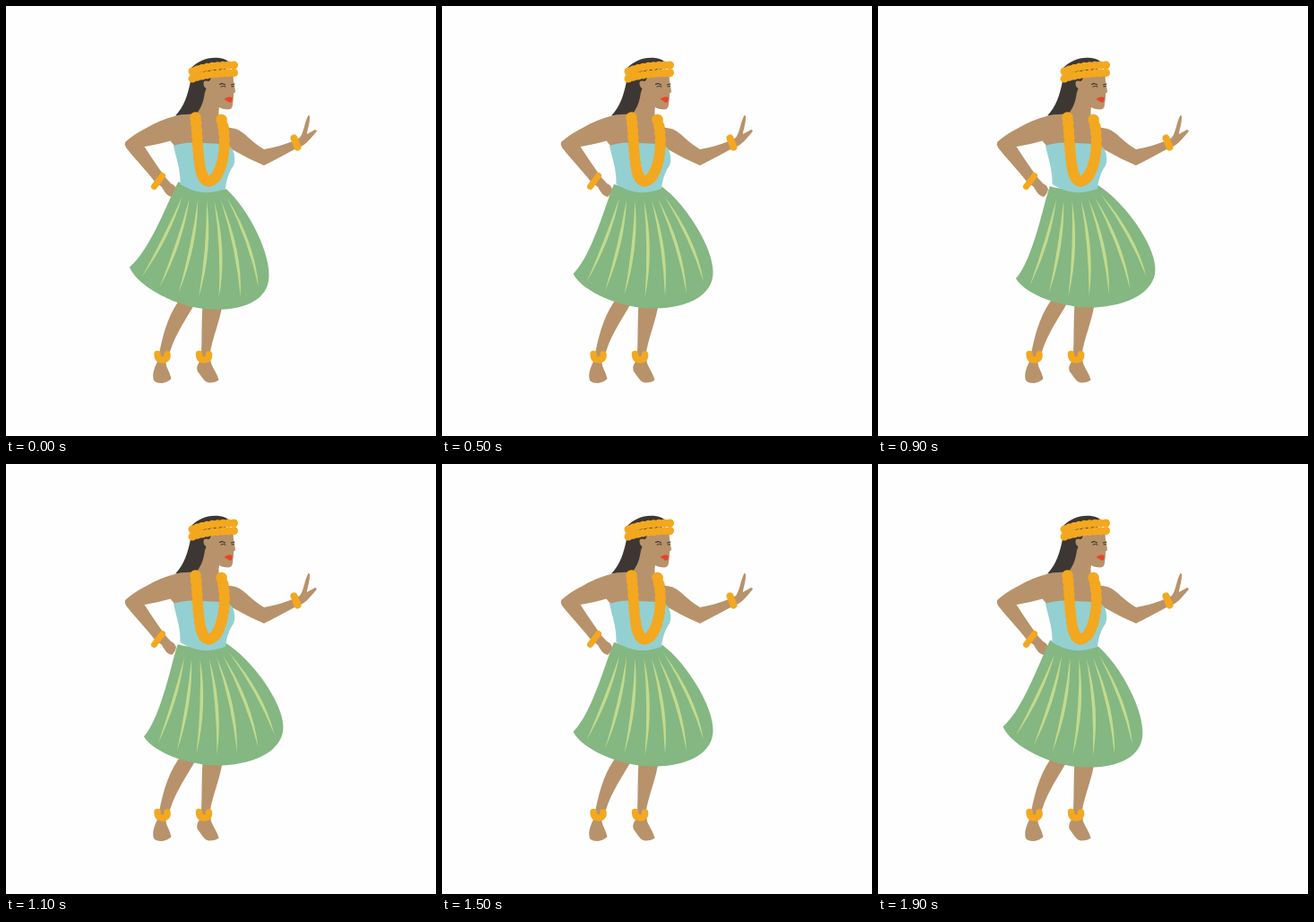
Animation of 480 by 480 pixels, one loop 2000 ms. Source, as an HTML page with a canvas:

```html
<!DOCTYPE html>
<html lang="en">
<head>
<meta charset="utf-8">
<title>Hula dancer</title>
<style>
  html, body { margin: 0; width: 100%; height: 100%; overflow: hidden; background: #fefefe; }
  canvas { display: block; width: 480px; height: 480px; }
</style>
</head>
<body>
<canvas id="stage" width="480" height="480"></canvas>
<script>
const ctx = document.getElementById('stage').getContext('2d');

const LOOP = 2000, STEP = 100;
const SWING = 5.3 * Math.PI / 180;
const HIP = { x: 222, y: 202 };
const SKIN = '#b8926a', HAIR = '#3d3733', FLOWER = '#f3a81f', TOP = '#94d0d1',
      SKIRT = '#84b782', PLEAT = '#c3da8d', LIPS = '#e8432b';

function fill(d, color) {
  ctx.fillStyle = color;
  ctx.fill(new Path2D(d));
}

function line(d, color, width) {
  ctx.strokeStyle = color;
  ctx.lineWidth = width;
  ctx.lineCap = 'round';
  ctx.lineJoin = 'round';
  ctx.stroke(new Path2D(d));
}

// Row of blossoms with a ruffled edge along a cubic curve
function garland([a, b, c, d], width, count) {
  const at = (i, t) => {
    const u = 1 - t;
    return u * u * u * a[i] + 3 * u * u * t * b[i] + 3 * u * t * t * c[i] + t * t * t * d[i];
  };
  line(`M${a}C${b} ${c} ${d}`, FLOWER, width - 1.5);
  ctx.fillStyle = FLOWER;
  for (let k = 0; k <= count; k++) {
    const t = k / count;
    ctx.beginPath();
    ctx.arc(at(0, t), at(1, t), width / 2, 0, 7);
    ctx.fill();
  }
}

// Tapered light fold from (x0,y0) to (x1,y1), bowed to the right
function pleat(x0, y0, x1, y1) {
  const bow = 8 + 0.06 * (x1 - x0);
  const cx = (x0 + x1) / 2 + bow, cy = (y0 + y1) / 2;
  fill(`M${x0} ${y0}Q${cx + 3.6} ${cy} ${x1} ${y1}Q${cx - 3.6} ${cy} ${x0} ${y0}Z`, PLEAT);
}

const pleats = [
  [198, 214, 161.5, 308], [206, 216, 182, 318], [215.5, 217, 203.5, 323],
  [225.5, 217, 226.5, 325], [234, 217, 249, 324], [241, 215, 273, 321],
  [248, 212, 292, 308]
];

function drawLegs() {
  fill('M196 325C183 341 176 362 171 388L168.5 398C164 407 163.5 413 165 418Q167 421 174 421Q181 420 184.5 416Q183 410 179.5 403L178 397L183 386C190 364 201 350 212 330Z', SKIN);
  fill('M220 325C218 350 219 368 218 388L215.5 398C213 401 212.5 405 214 408C219 414 221 420 227 420.5Q234 420.5 237.5 417.5C236 411 232 406 229 399L227.5 390C230 370 239 353 242 330Z', SKIN);
  line('M169 388.5Q169 395 174.5 395Q180.5 395 180 389', FLOWER, 7.5);
  line('M215.5 388.5Q215.5 395 221 395Q227 395 226.5 389', FLOWER, 7.5);
}

function drawBody() {
  // face, neck and chest
  fill('M220 76L254 76C253 83 255.5 90 256 95Q256 97 254 97.5L254 101L253.5 106C253 111 253 115.5 248 115.5Q241 115 238 113Q236 122 240 128Q245 135 253 137L253 162L188 157L190 123L210 119L215 110L218 90Z', SKIN);
  // arm on the hip
  fill('M210 120Q199 120 190 122.5Q172 127 157 136Q143 143 133 152Q132 155 134 158C145 172 157 184 166 196L174 202C177 208 180 212 185 213Q188 211 190 205Q189 200 184 198L178 191.5C170 180 162 169 154.5 157Q171 154 183.5 150.5L188 156L206 154Z', SKIN);
  // reaching arm
  fill('M247 136Q257 135 265 142C273 149 281 156 288 160C300 158 310 155 320 151L328 147C333 140 333 130 337.5 122Q339.5 122 339 125C339 132 336 139 336 143L345 138Q348 139 346 141L339 149Q333 156 326 158C314 164 302 171 288 178Q271 171 254 161L248 158Z', SKIN);
  line('M165.5 201.5L174.5 189.5', FLOWER, 7);
  line('M321.5 147.5L325.5 157.5', FLOWER, 8);
}

function drawHead() {
  fill('M189 122.5C199 112 203 99 206 84L206 70C214 61 226 56.5 238 58C246 59 251 63 252 67L229 79Q228 84 226 84Q220 82 220.5 87Q221 91 223.5 92Q221.5 97 221 102Q219 113 212 121Q200 120 189 122.5Z', HAIR);
  line('M238.5 87.5Q241.5 85.5 244.5 88', HAIR, 1.1);
  line('M240 90Q242.5 88.7 245 90', HAIR, 1);
  line('M251.5 88L255 87', HAIR, 1.1);
  line('M252 90L254.5 89.5', HAIR, 1);
  fill('M243.5 104Q247 101 249.5 101.5Q252 101 253 103L252 107Q249 108.5 247 106Z', LIPS);
  // headband
  garland([[208, 73], [222, 67], [238, 66], [254.5, 66]], 9, 8);
  garland([[208, 81], [222, 76], [238, 75], [254.5, 74.5]], 9, 8);
}

function drawSkirt(angle) {
  ctx.save();
  ctx.translate(HIP.x, HIP.y);
  ctx.rotate(angle);
  ctx.translate(-HIP.x, -HIP.y);
  fill('M192 199C184 216 168 278 146.5 299C158 321 206 339 238 337.5C276 337 303 322 302.5 297C303 272 275 224 246 202C230 206 208 205 192 199Z', SKIRT);
  pleats.forEach(p => pleat(...p));
  ctx.restore();
}

function drawTop() {
  fill('M187 156Q198 152 211 152.5L240 154Q248 153 253 160Q257 170 254 178C248 187 246 195 245 204Q232 209 219 208Q205 206 194.5 199C195 183 190 170 187 156Z', TOP);
  garland([[211.5, 124.5], [215, 150], [213, 195.5], [226, 195.5]], 12.5, 12);
  garland([[226, 195.5], [240, 195.5], [249, 155], [240.5, 127]], 12.5, 12);
}

function draw(now) {
  const step = Math.floor(now % LOOP / STEP);
  const phase = Math.abs(10 - step) / 5 - 1;
  ctx.fillStyle = '#fefefe';
  ctx.fillRect(0, 0, 480, 480);
  drawLegs();
  drawBody();
  drawHead();
  drawSkirt(phase * SWING);
  drawTop();
}

const start = performance.now();
function tick() {
  draw(performance.now() - start);
  requestAnimationFrame(tick);
}
tick();
</script>
</body>
</html>
```
